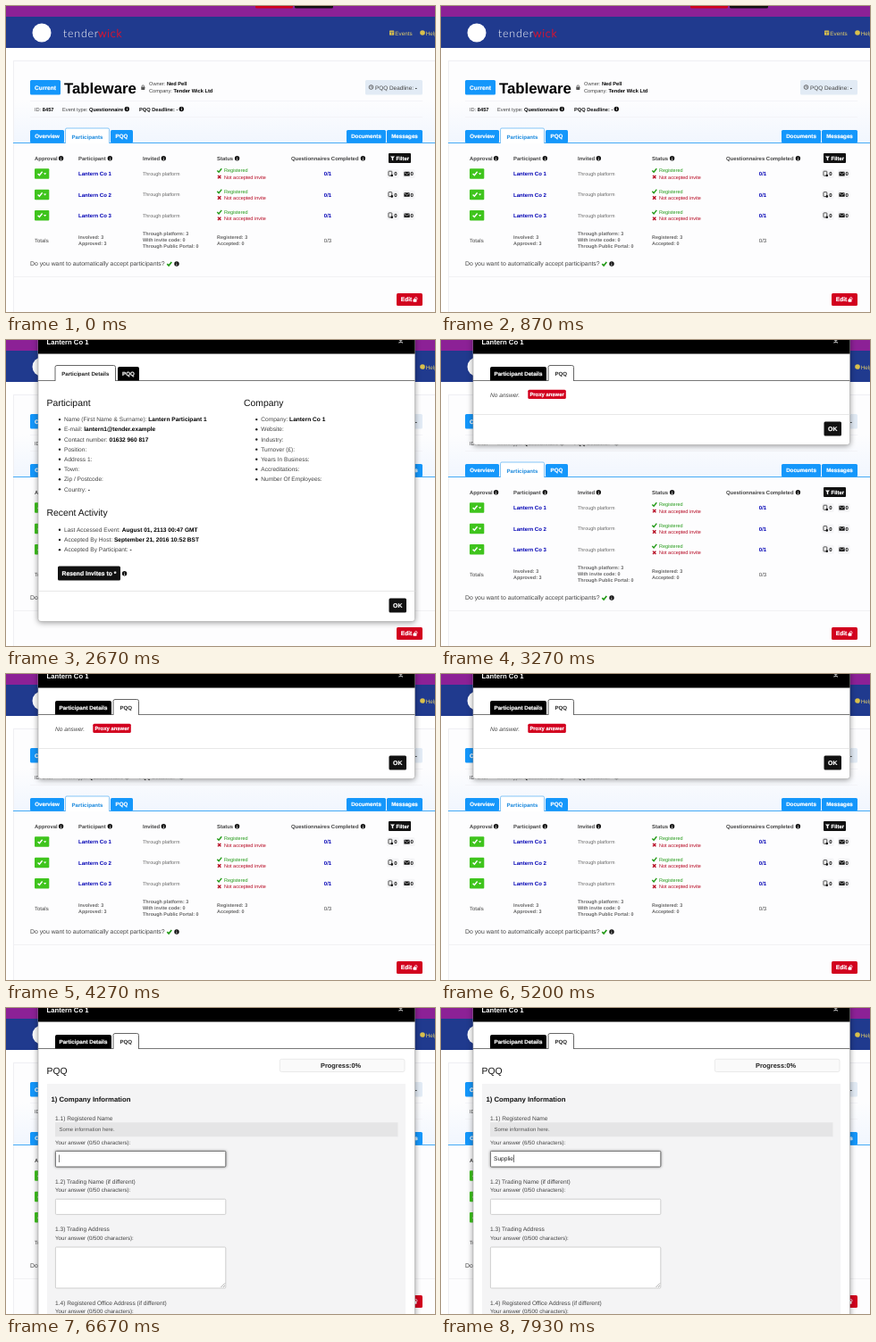
These frames come from a looping animation (480x343 px, 8000 ms). An HTML page:

```html
<!DOCTYPE html>
<html lang="en">
<head>
<meta charset="utf-8">
<title>Participant questionnaire</title>
<style>
  html, body { margin: 0; width: 100%; height: 100%; overflow: hidden; background: #fff; }
  svg { display: block; width: 100%; height: 100%; font-family: "Liberation Sans", Arial, sans-serif; }
  text { white-space: pre; text-rendering: geometricPrecision; }
  .label { stroke: #fff; stroke-width: .2px; }
  .frame { filter: drop-shadow(0 1.5px 3px rgba(0, 0, 0, .4)); }
  .wordmark { font-family: Lato, sans-serif; font-weight: 300; letter-spacing: .75px; }
</style>
</head>
<body>
<svg id="stage" viewBox="0 0 480 343"></svg>
<script>
const LOOP = 8000;
const BLUE = '#1497fb', RED = '#d2001e', GREEN = '#3fc41d', INK = '#444', NAVY = '#0000b4';

// ---- drawing helpers: each returns SVG markup ----
const rect = (x, y, w, h, fill, radius = 0, attrs = '') =>
  `<rect x="${x}" y="${y}" width="${w}" height="${h}" fill="${fill}" rx="${radius}" ${attrs}/>`;
const line = (d, stroke, width = 1, attrs = '') =>
  `<path d="${d}" fill="none" stroke="${stroke}" stroke-width="${width}" ${attrs}/>`;
const shape = (d, fill, attrs = '') => `<path d="${d}" fill="${fill}" ${attrs}/>`;
const dot = (x, y, r, fill) => `<circle cx="${x}" cy="${y}" r="${r}" fill="${fill}"/>`;
const group = (id, ...parts) => `<g id="${id}">${parts.join('')}</g>`;

// Text between bars is bold black: "Owner: |Name|".
const text = (x, y, size, str, fill = INK, attrs = '') => {
  const runs = str.split('|').map((s, i) => i % 2 ? `<tspan font-weight="700" fill="#000">${s}</tspan>` : s);
  return `<text x="${x}" y="${y}" font-size="${size}" fill="${fill}" ${attrs}>${runs.join('')}</text>`;
};
const bold = (x, y, size, str, fill = '#111', attrs = '') =>
  text(x, y, size, str, fill, 'font-weight="700" ' + attrs);
const label = (x, y, size, str) => bold(x, y, size, str, '#fff', 'text-anchor="middle" class="label"');
const button = (x, y, w, h, fill, caption, size = 6.3, captionX = x + w / 2, radius = 1.5) =>
  rect(x, y, w, h, fill, radius) + label(captionX, y + h / 2 + size * .36, size, caption);
const info = (x, y) => dot(x, y, 2.7, '#111') + bold(x, y + 1.7, 4.8, 'i', '#fff', 'text-anchor="middle"');
const check = (x, y, color, w = 1.4) => line(`M${x - 2.4} ${y}l1.8 1.8l3.2 -4`, color, w);
const cross = (x, y, color) => line(`M${x - 1.7} ${y - 1.7}l3.4 3.4m0 -3.4l-3.4 3.4`, color, 1.3);
const lock = (x, y, color, open = 0) =>
  rect(x - 2, y - .5, 4, 3.2, color, .4) +
  line(`M${x - 1.2 + open} ${y}v-1.3a1.2 1.2 0 0 1 2.4 0v1.3`, color, .8);

// ---- page behind the dialog ----
function header() {
  return rect(0, 0, 480, 12.5, '#8c2196') + rect(0, 12, 480, 35, '#203a8e') +
    rect(279, -4, 42, 6.5, '#d0021b', 1.5) + rect(323, -4, 43, 6.5, '#111', 1.5) +
    dot(40, 30, 10.5, '#fff') +
    text(64, 34.5, 12.5, 'tender', '#fff', 'class="wordmark"') +
    text(103, 34.5, 12.5, 'wick', '#e0122c', 'class="wordmark" stroke="#e0122c" stroke-width=".3"') +
    rect(429, 27.5, 5.2, 5.2, '#d9c04c', .6) + line('M429.5 29.3h4.2M431.6 29.5v3', '#203a8e', .5) +
    text(435.3, 32.6, 6.3, 'Events', '#e4cf68') +
    dot(466, 30, 2.8, '#d9c04c') + text(469.7, 32.6, 6.3, 'Help', '#e4cf68');
}

function summary() {
  return rect(8.5, 61.5, 480, 300, '#fdfdfe', 0, 'stroke="#efeff3"') +
    `<linearGradient id="wash" x2="0" y2="1"><stop stop-color="#fdfdfe"/><stop offset="1" stop-color="#f1f6fe"/></linearGradient>` +
    rect(9, 106, 471, 48, 'url(#wash)') +
    button(27, 83, 34, 16.5, BLUE, 'Current', 6.6) +
    bold(65, 97.6, 16.8, 'Tableware', '#000') + lock(153.3, 91.3, '#555') +
    text(160, 89.2, 5.7, 'Owner: |Ned Pell|') +
    text(160, 97, 5.7, 'Company: |Tender Wick Ltd|') +
    rect(402, 83, 64, 16.5, '#e2ebf5', 1.5) +
    `<circle cx="408.5" cy="91" r="2.3" fill="none" stroke="#444" stroke-width=".8"/>` +
    line('M408.5 89.6v1.6h1.1', INK, .6) + text(413, 93.6, 6.4, 'PQQ Deadline: |-|') +
    line('M27 106.5H466M27 124.5H466', '#f3f3f6', .8) +
    text(32, 117.6, 5.7, 'ID: |8457|') +
    text(63, 117.6, 5.7, 'Event type: |Questionnaire|') + info(135.3, 115.5) +
    bold(149, 117.6, 5.7, 'PQQ Deadline: -') + info(196.3, 115.5);
}

function pageTabs() {
  return line('M8 153.5H480', '#45aaf6') +
    button(27, 139, 38, 14.5, BLUE, 'Overview', 6.2) +
    shape('M66.5 154V138.5a1.5 1.5 0 0 1 1.5 -1.5H114a1.5 1.5 0 0 1 1.5 1.5V154', '#fff', 'stroke="#69b8f4" stroke-width=".8"') +
    bold(91, 148.5, 6.1, 'Participants', '#1988dd', 'text-anchor="middle"') +
    button(117, 139, 25, 14.5, BLUE, 'PQQ', 6.2) +
    button(381, 139, 44, 14.5, BLUE, 'Documents', 6.2) +
    button(426, 139, 40, 14.5, BLUE, 'Messages', 6.2);
}

function participantRow(number, y) {
  return rect(32, y - 5.7, 16.3, 11.5, GREEN, 1) + check(38, y, '#fff') +
    shape(`M42 ${y - .8}h3.2l-1.6 2z`, '#fff') +
    bold(81, y + 2.3, 6.05, 'Lantern Co ' + number, NAVY) +
    text(153, y + 2, 5.45, 'Through platform', '#666') +
    check(238.7, y - 3.6, '#229a16') + text(244, y - 1.6, 5.5, 'Registered', '#229a16') +
    cross(238.7, y + 3.6, '#b4001c') + text(244, y + 5.6, 5.5, 'Not accepted invite', '#b4001c') +
    bold(360, y + 2.2, 6, '0/1', NAVY, 'text-anchor="middle"') +
    rect(426, y - 5, 13.5, 10, '#f5f5f7', 1.5) + rect(444, y - 5, 13.5, 10, '#f5f5f7', 1.5) +
    rect(428, y - 2.8, 3.8, 5, '#fff', .5, 'stroke="#222" stroke-width=".8"') + dot(431.8, y + 2, 1.3, '#111') +
    bold(434.3, y + 2.1, 6, '0') +
    rect(445.4, y - 2.2, 6.3, 4.6, '#111', .5) + line(`M445.6 ${y - 1.6}l3 2.2l3 -2.2`, '#fff', .6) +
    bold(452.5, y + 2.1, 6, '0');
}

function table() {
  const columns = [[32, 'Approval', 61.6], [81, 'Participant', 116.3], [153, 'Invited', 176.3],
    [236, 'Status', 258.6], [319, 'Questionnaires Completed', 399.4]];
  const total = (x, y, str) => bold(x, y, 5.4, str, '#666');
  return columns.map(([x, title, infoX]) => bold(x, 172.8, 5.95, title, INK) + info(infoX, 170.8)).join('') +
    button(428, 165, 25, 11, '#111', 'Filter', 5.9, 443.8, 1) +
    shape('M430 168.4h5l-1.8 2.2v3l-1.4 -1v-2z', '#fff') +
    [188, 211.4, 234.7].map((y, i) => participantRow(i + 1, y)).join('') +
    text(32, 264.6, 6, 'Totals') +
    total(81, 260.5, 'Involved: 3') + total(81, 268, 'Approved: 3') +
    total(153, 257, 'Through platform: 3') + total(153, 264.2, 'With invite code: 0') +
    total(153, 271.4, 'Through Public Portal: 0') +
    total(236, 260.5, 'Registered: 3') + total(236, 268, 'Accepted: 0') +
    text(360, 264.6, 6, '0/3', INK, 'text-anchor="middle"') +
    text(27, 291.3, 6.86, 'Do you want to automatically accept participants?') +
    check(182.7, 289.2, '#229a16', 1.7) + info(191, 289) +
    line('M9 303.5H480', '#f1f1f4') +
    button(437, 322, 29, 14, RED, 'Edit', 6.6, 448) + lock(457.5, 329, '#fff', 1.2);
}

// ---- dialog ----
const activeTab = (x, w) =>
  shape(`M${x} 46V30.5a2 2 0 0 1 2 -2h${w - 4}a2 2 0 0 1 2 2V46`, '#fff', 'stroke="#555" stroke-width=".9"');
const blackTab = (x, w, caption) => shape(`M${x} 45.5V32a2 2 0 0 1 2 -2h${w - 4}a2 2 0 0 1 2 2V45.5z`, '#000') +
  label(x + w / 2, 40.2, 6.2, caption);
const footer = bottom => line(`M36 ${bottom - 34}H457.5`, '#e3e3e3', .8) +
  button(428.5, bottom - 26, 19.5, 16, '#111', 'OK', 6.9);
const bullets = (x, y, items) => items.map((item, i) =>
  dot(x, y + i * 11.18 - 2.2, 1.2, '#222') + text(x + 5, y + i * 11.18, 6.58, item)).join('');
const heading = (x, y, str) => text(x, y, 10.4, str, '#111');

function details() {
  return activeTab(55, 67.5) + bold(88.8, 40.2, 6.1, 'Participant Details', '#222', 'text-anchor="middle"') +
    blackTab(125, 24, 'PQQ') +
    heading(45.5, 73.6, 'Participant') +
    bullets(60, 91.3, ['Name (First Name &amp; Surname): |Lantern Participant 1|', 'E-mail: |lantern1@tender.example|',
      'Contact number: |01632 960 817|', 'Position:', 'Address 1:', 'Town:', 'Zip / Postcode:', 'Country: |-|']) +
    heading(266, 73.6, 'Company') +
    bullets(280.3, 91.3, ['Company: |Lantern Co 1|', 'Website:', 'Industry:', 'Turnover (£):',
      'Years In Business:', 'Accreditations:', 'Number Of Employees:']) +
    heading(45.5, 197.3, 'Recent Activity') +
    bullets(60, 215, ['Last Accessed Event: |August 01, 2113 00:47 GMT|',
      'Accepted By Host: |September 21, 2016 10:52 BST|', 'Accepted By Participant: |-|']) +
    button(58, 253.5, 70, 16, '#111', 'Resend Invites to *', 6.8) + info(132.6, 261.8) +
    footer(315.5);
}

const questionnaireTabs = () => blackTab(55, 63, 'Participant Details') + activeTab(120, 28.5) +
  bold(134.3, 40.2, 6.1, 'PQQ', '#222', 'text-anchor="middle"');

function noAnswer() {
  return questionnaireTabs() + text(55, 63.8, 6.6, 'No answer.', INK, 'font-style="italic"') +
    button(97.3, 55.7, 42.5, 10.4, RED, 'Proxy answer', 5.9) + footer(117.5);
}

function form() {
  const input = (y, h, attrs = '') =>
    rect(55.4, y, 190.4, h, '#fff', 1, `stroke="#c4c4c4" stroke-width=".8" ${attrs}`);
  const question = (y, str) => text(55, y, 6.6, str);
  const hint = (y, limit, attrs) => text(55, y, 6.2, `Your answer (0/${limit} characters):`, INK, attrs);
  return questionnaireTabs() + heading(45.5, 73.6, 'PQQ') +
    rect(306.4, 57.3, 139.6, 14.2, '#fafafa', 2, 'stroke="#e6e6e6" stroke-width=".8"') +
    rect(306, 57, 140, 14.5, '#ec0d19', 2, 'id="progress"') +
    bold(374.6, 67, 7.36, 'Progress:0%', '#222',
      'text-anchor="middle" stroke="#f5f5f5" stroke-width="1" paint-order="stroke"') +
    rect(46, 85, 401, 270, '#f4f4f5') +
    bold(50.5, 104.8, 7.74, '1) Company Information') +
    question(126.2, '1.1) Registered Name') + rect(55, 128.3, 383.5, 16, '#e5e5e6') +
    text(59.5, 138.4, 5.97, 'Some information here.', '#555') +
    hint(152.8, 50, 'id="counter"') + input(160.4, 17.6, 'id="nameField"') +
    text(59, 171, 6.6, '', '#222', 'id="typed"') + rect(0, 164.5, .6, 8.5, '#222', 0, 'id="caret"') +
    question(196.8, '1.2) Trading Name (if different)') + hint(206.3, 50) + input(214.2, 17.2) +
    question(250.3, '1.3) Trading Address') + hint(260, 500) + input(268, 46) +
    line('M240.5 313l4.5 -4.5M243 313l2 -2', '#777', .6) +
    question(332.7, '1.4) Registered Office Address (if different)') + hint(342.2, 500) +
    rect(443.6, 56, 3.6, 142, '#858585', 1.8, 'id="scrollbar"');
}

const stage = document.getElementById('stage');
stage.innerHTML = rect(0, 0, 480, 343, '#fff') + header() + summary() + pageTabs() + table() +
  group('dialog',
    rect(36, -20, 421.5, 336, '#fff', 3, 'id="panel" class="frame" stroke="#aaa" stroke-width=".6"'),
    rect(36, -20, 421.5, 35.5, '#000'),
    bold(45.5, 4.6, 7.7, 'Lantern Co 1', '#fff'), line('M439.5 -1l4.4 4.4m0 -4.4l-4.4 4.4', '#aaa', 1.3),
    line('M36 45.5H457.5', '#777'),
    group('details', details()), group('noAnswer', noAnswer()), group('form', form()));

// ---- motion ----
const $ = id => document.getElementById(id);
const ramp = (t, start, length) => Math.min(1, Math.max(0, (t - start) / length));
const swing = p => .5 - Math.cos(Math.PI * p) / 2;
const show = (id, on) => $(id).setAttribute('display', on ? 'inline' : 'none');
const OPEN = 1270, SWITCH_TAB = 2780, LOAD_FORM = 5330, FOCUS = 6400, TYPE = 6900, KEY_GAP = 165;

function render(t) {
  const view = t < SWITCH_TAB ? 'details' : t < LOAD_FORM ? 'noAnswer' : 'form';
  const bottom = { details: 315.5, noAnswer: 117.5, form: 380 }[view];
  show('dialog', t >= OPEN);
  $('dialog').setAttribute('transform', `translate(0 ${-330 * (1 - swing(ramp(t, OPEN, 300)))})`);
  $('panel').setAttribute('height', bottom + 20);
  for (const id of ['details', 'noAnswer', 'form']) show(id, id === view);

  $('progress').setAttribute('width', 140 * (1 - swing(ramp(t, 5420, 700))));
  $('scrollbar').setAttribute('opacity', 1 - ramp(t, 5850, 250));

  const focused = t >= FOCUS;
  const letters = t < TYPE ? 0 : Math.min(7, 1 + Math.floor((t - TYPE) / KEY_GAP));
  $('typed').textContent = 'Supplie'.slice(0, letters);
  $('counter').textContent = `Your answer (${Math.max(0, letters - 1)}/50 characters):`;
  $('nameField').setAttribute('stroke', focused ? '#555' : '#c4c4c4');
  $('nameField').style.filter = focused ? 'drop-shadow(0 0 1.5px rgba(0,0,0,.5))' : 'none';
  show('caret', focused && view === 'form');
  $('caret').setAttribute('x', 59.2 + (letters ? $('typed').getComputedTextLength() : 0));
}

function tick() {
  render(performance.now() % LOOP);
  requestAnimationFrame(tick);
}
tick();
</script>
</body>
</html>
```
